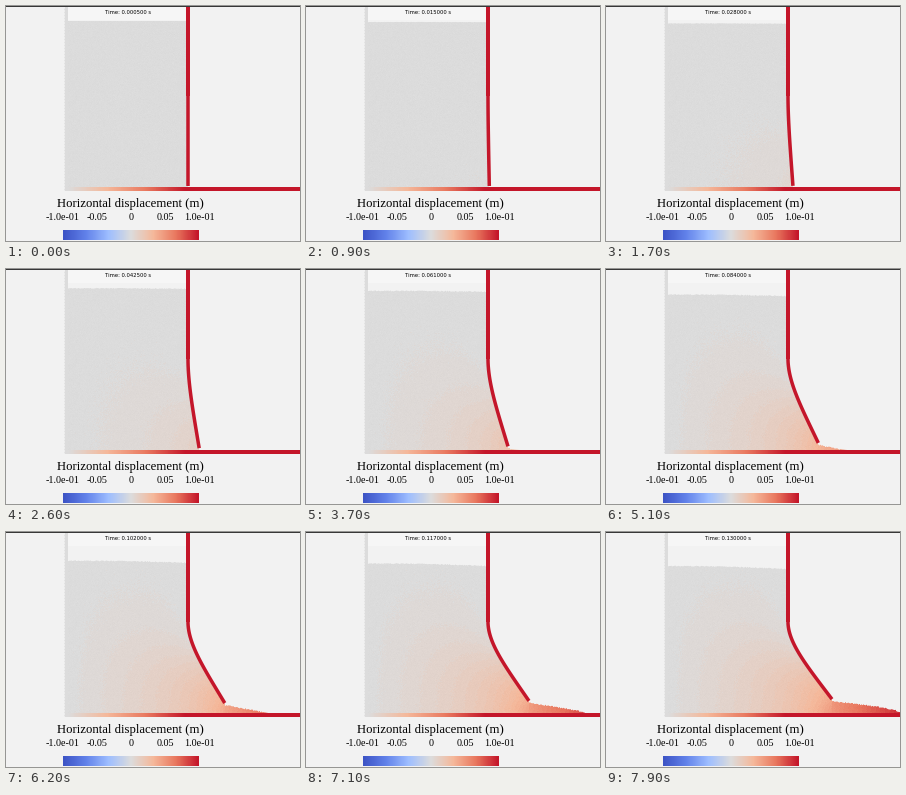
A matplotlib script for the animation above (8000 ms loop, 294x235 px).

```python
import numpy as np
import matplotlib.pyplot as plt
from matplotlib.animation import FuncAnimation
from matplotlib.colors import LinearSegmentedColormap
from matplotlib.patches import Rectangle

W, H, DPI = 294, 235, 64
PT = 72 / DPI                       # points per pixel
FRAMES, STEP = 80, 100

LEFT, GATE, FLOOR, CLAMP = 62, 182, 181, 90
SPAN = 118                          # pixels per 0.1 m
RED, GREY = "#c4162a", "#dcdcdc"

RAMP = ["#3d54c6", "#6282ea", "#9ebeff", GREY, "#f5b89a", "#e9785f", RED]
smooth = LinearSegmentedColormap.from_list("smooth", RAMP, N=256)
banded = LinearSegmentedColormap.from_list("banded", RAMP, N=75)

rng = np.random.default_rng(4)
grain = rng.normal(0, 0.003, (H, W))
speckle = rng.normal(0, 0.004, (H, W, 1))
ragged = rng.uniform(-1, 1, W)

xs = np.arange(W) + 0.5
ys = np.arange(H) + 0.5
X, Y = np.meshgrid(xs, ys)


def bend(u):
    """Cantilever under an even load, 0 at the clamp and 1 at the tip."""
    return (u**4 - 4 * u**3 + 6 * u**2) / 3


# Harmonic field in the tank: zero at the left wall, gate shape at the right.
DEPTH = 166
h = np.linspace(0, DEPTH, 400)
push = bend(np.clip(1 - h / (FLOOR - CLAMP), 0, 1))
modes = []
for m in range(9):
    k = (m + 0.5) * np.pi / DEPTH
    amp = 2 * np.mean(push * np.cos(k * h))
    modes.append((k * SPAN, amp * np.cos(k * (FLOOR - ys))[:, None]))


def tank_field(r):
    return sum(a * np.sinh(k * r) / np.sinh(k) for k, a in modes)


def deflection(n):
    """Tip travel: slow start, then easing towards a limit."""
    return 61 / (1 + (51.3 / n) ** 2.2) if n else 0


def gate_curve(d):
    u = np.linspace(0, 1, 60)
    drop = 90 - 0.57 * d**2 / 86
    return GATE + d * bend(u), CLAMP + drop * u


def fluid(n, d, gx, gy):
    s = n / (FRAMES - 1)
    top = 15 + 19 * s**1.35 + 3 * s**1.5 * ((xs - LEFT) / SPAN) ** 2
    top += ragged * min(0.4, s)

    right = np.interp(ys, gy, gx)[:, None]
    reach = 1.35 * d / SPAN
    value = reach * tank_field(np.clip((X - LEFT) / (right - LEFT), 0, 1))
    cover = np.clip(Y - top + 0.5, 0, 1) * (X < right) * (X > LEFT)

    tip_x, tip_y = gx[-1], gy[-1]
    front = 213 + 1.9 * (n - 36)
    if front > tip_x + 2:
        w = np.clip((xs - tip_x) / (front - tip_x), 0, 1)
        rise = max(0, FLOOR - tip_y - 2) * (1 - w) ** (1.6 - (n - 36) / 43)
        rise += 0.6 * ragged * (rise > 1)
        jet = (X >= tip_x) & (X < front)
        cover = np.where(jet, np.clip(Y - FLOOR + rise + 0.5, 0, 1), cover)
        value = np.where(jet, reach + (X - tip_x) / 170, value)

    rgba = banded(0.5 + (value + grain * min(1, 8 * s)) / 2)
    rgba[..., :3] = np.clip(rgba[..., :3] + speckle, 0, 1)
    rgba[..., 3] = cover * (Y < FLOOR + 1)
    return rgba


fig = plt.figure(figsize=(W / DPI, H / DPI), dpi=DPI, facecolor="#f2f2f2")
ax = fig.add_axes([0, 0, 1, 1])


def box(x, y, w, h, color, z):
    ax.add_patch(Rectangle((x, y), w, h, fc=color, lw=0, zorder=z))


def strip(values, x0, x1, y0, y1):
    ax.imshow(smooth(0.5 + values / 2)[None], extent=(x0, x1, y1, y0),
              aspect="auto", interpolation="nearest", zorder=4)


def label(x, y, text, size, family="Liberation Serif"):
    return ax.text(x, y, text, fontsize=size * PT, family=family, color="black",
                   ha="center", va="baseline", zorder=8)


box(LEFT, 1, SPAN, 13, "#f6f6f6", 1)
box(0, 0, W, 1, "#383838", 7)

# Left wall with its beaded edge, and the floor coloured by position.
box(59, 1, 3, 183, GREY, 2)
beads = np.arange(2.5, 184, 3)
ax.scatter(np.full(beads.size, 59.2), beads, s=(2.4 * PT) ** 2, c=GREY, lw=0, zorder=2)
floor_x = np.arange(59, W) + 0.5
strip(np.clip((floor_x - LEFT) / SPAN, 0, 1), 59, W, FLOOR, FLOOR + 4)

strip(np.linspace(-1, 1, 136), 57, 193, 224, 234)
label(124.5, 201, "Horizontal displacement (m)", 12.8)
for i, text in enumerate(("-1.0e-01", "-0.05", "0", "0.05", "1.0e-01")):
    label(57 + 34 * i, 214, text, 10.1)

clock = label(122, 8, "", 5.2, "DejaVu Sans")
water = ax.imshow(np.zeros((H, W, 4)), extent=(0, W, H, 0), aspect="auto",
                  interpolation="nearest", zorder=3)
box(GATE - 2, 1, 4, CLAMP - 1, RED, 6)
gate, = ax.plot([], [], color=RED, lw=3.5 * PT, solid_capstyle="butt", zorder=6)

ax.set_xlim(0, W)
ax.set_ylim(H, 0)
ax.axis("off")


def draw(n):
    d = deflection(n)
    gx, gy = gate_curve(d)
    water.set_data(fluid(n, d, gx, gy))
    gate.set_data(gx, gy)
    clock.set_text(f"Time: {0.0005 * max(1, round(3.29 * n - 0.05)):.6f} s")
    return water, gate, clock


anim = FuncAnimation(fig, draw, frames=FRAMES, interval=STEP, repeat=True, repeat_delay=0)
plt.show()
```
